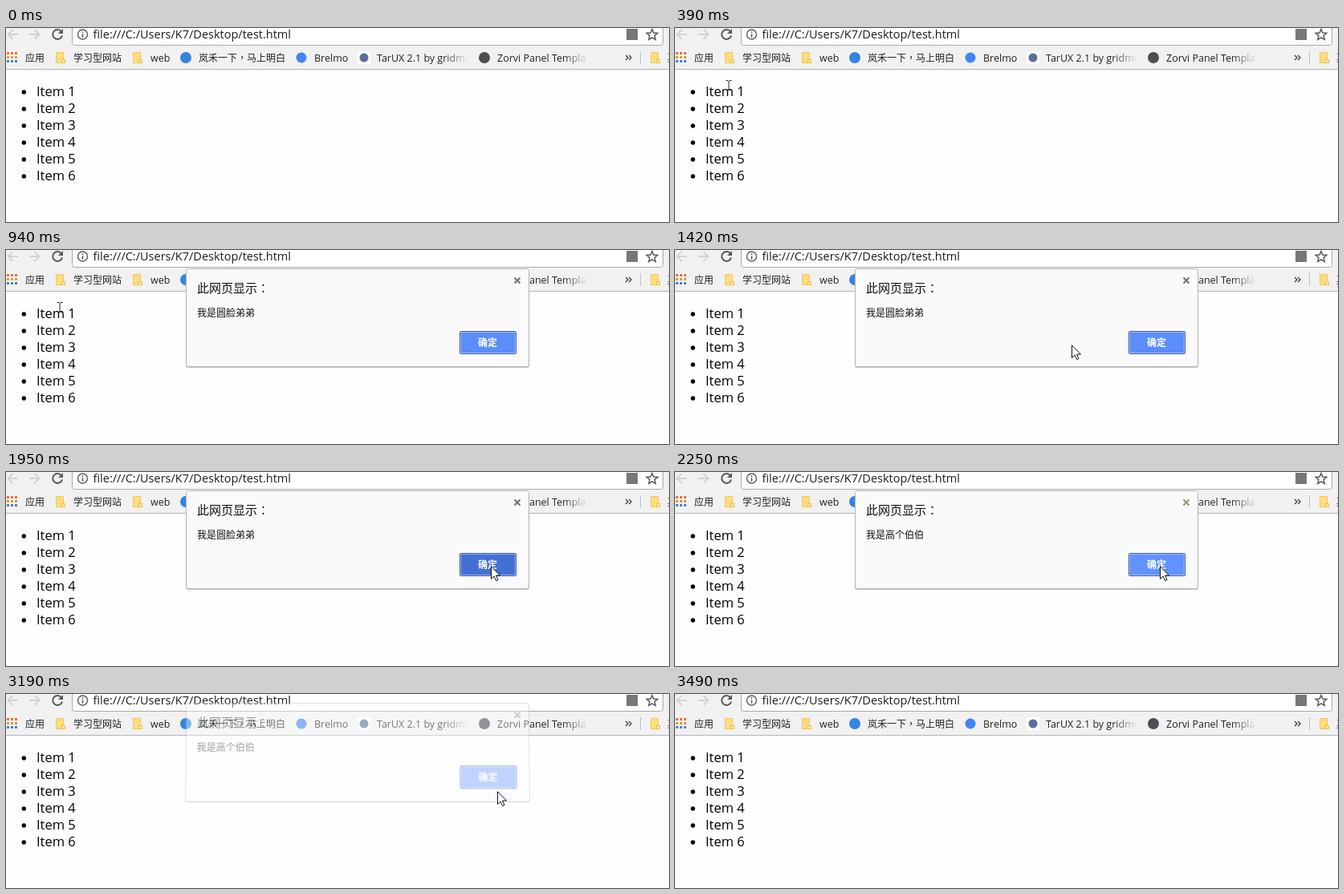
Write an HTML page that moves like this. It is 826 by 242 pixels and loops after 4.27 s.

```html
<!DOCTYPE html>
<html lang="zh-CN">
<head>
<meta charset="utf-8">
<title>test.html</title>
<style>
  html, body { margin: 0; width: 100%; height: 100%; overflow: hidden; background: #fefefe; }
  .stage { position: relative; width: 826px; height: 242px; overflow: hidden; }
  .layer { position: absolute; left: 0; top: 0; width: 826px; height: 242px; }
  text { font-family: "Open Sans", "Noto Sans CJK SC", "Noto Sans CJK JP", "Noto Sans", sans-serif; white-space: pre; }
  .cjk { font: 12px "Noto Sans CJK SC", "Noto Sans CJK JP", sans-serif; }
  .mid { font-family: "Noto Sans CJK TC", "Noto Sans CJK SC", sans-serif; } /* centred punctuation */
  .mark { font-size: 12.5px; }
  .url { font-size: 14.5px; }
  .item { font-size: 16.5px; }
  .title { font-size: 15px; }
  .ok { font-weight: 700; }

  .alert, .cursor { animation: 4270ms step-end infinite; }
  .alert { transform-origin: 438px 24px; opacity: 0; color: #5b8dfb; }
  #first { --paper: #fafafa; --cross: #757575; animation-name: first; }
  #second { --paper: #f9fbfb; --cross: #8f9d78; animation-name: second; }
  #beam { animation-name: beam; }
  #arrow { animation-name: arrow; }
  .cursor { opacity: 0; }

  @keyframes first {
    0% { opacity: 0; }
    18.03% { opacity: .56; transform: translateY(-11px) perspective(600px) rotateX(1.3deg); }
    19.9% { opacity: .92; transform: translateY(-2px) perspective(600px) rotateX(.3deg); }
    22.01% { opacity: 1; transform: none; color: #5b8dfb; }
    40.28% { opacity: 1; color: #6192ff; }
    45.66% { opacity: 1; color: #4470d6; }
    49.18% { opacity: .5; color: #6192ff; transform: translateY(-4px); }
    50.81%, 100% { opacity: 0; }
  }
  @keyframes second {
    0% { opacity: 0; }
    49.18% { opacity: .45; transform: translateY(-14px) perspective(600px) rotateX(1.5deg); }
    50.81% { opacity: .9; transform: translateY(-3px) perspective(600px) rotateX(.4deg); }
    52.69% { opacity: 1; transform: none; color: #6192ff; }
    69.32% { opacity: 1; color: #4470d6; }
    72.83% { opacity: .8; color: #6192ff; transform: translateY(-4px) perspective(600px) rotateX(.4deg); }
    74.7% { opacity: .4; transform: translateY(-12px) perspective(600px) rotateX(1.2deg); }
    76.34% { opacity: .1; transform: translateY(-19px) perspective(600px) rotateX(1.6deg); }
    78.22%, 100% { opacity: 0; }
  }
  @keyframes beam {
    0% { opacity: 0; }
    1.63% { opacity: 1; transform: translate(37px, 99px); }
    3.51% { opacity: 1; transform: translate(44px, 91px); }
    5.38% { opacity: 1; transform: translate(54px, 82px); }
    7.25% { opacity: 1; transform: translate(63px, 75px); }
    9.13% { opacity: 1; transform: translate(67px, 72px); }
    25.52%, 100% { opacity: 0; }
  }
  @keyframes arrow {
    0% { opacity: 0; }
    25.52% { opacity: 1; transform: translate(92px, 64px); }
    27.4% { opacity: 1; transform: translate(160px, 70px); }
    29.27% { opacity: 1; transform: translate(290px, 90px); }
    31.14% { opacity: 1; transform: translate(428px, 110px); }
    33.25% { opacity: 1; transform: translate(494px, 118px); }
    34.89% { opacity: 1; transform: translate(528px, 118px); }
    36.53% { opacity: 1; transform: translate(541px, 118px); }
    38.4% { opacity: 1; transform: translate(554px, 118px); }
    40.28% { opacity: 1; transform: translate(576px, 118px); }
    42.15% { opacity: 1; transform: translate(594px, 118px); }
    43.79% { opacity: 1; transform: translate(604px, 117px); }
    74.7% { opacity: 1; transform: translate(612px, 121px); }
    76.34% { opacity: 1; transform: translate(632px, 134px); }
    78.22% { opacity: 1; transform: translate(655px, 149px); }
    79.85% { opacity: 1; transform: translate(675px, 162px); }
    81.73%, 100% { opacity: 0; }
  }
</style>
</head>
<body>
<div class="stage">
  <svg class="layer" viewBox="0 0 826 242">
    <defs>
      <linearGradient id="fadeA" gradientUnits="userSpaceOnUse" x1="545" x2="576">
        <stop stop-color="#222"/><stop offset="1" stop-color="#222" stop-opacity="0"/>
      </linearGradient>
      <linearGradient id="fadeB" gradientUnits="userSpaceOnUse" x1="694" x2="725">
        <stop stop-color="#222"/><stop offset="1" stop-color="#222" stop-opacity="0"/>
      </linearGradient>
      <g id="folder">
        <path d="M.5 .5h9v9h2v4h-11z" fill="#ffdd7d" stroke="#efc75f"/>
        <path d="M7.5 9.5h4v4h-4z" fill="#ffe8a3" stroke="#e9bd4d"/>
      </g>
      <g id="box">
        <rect x="224" y="25" width="428" height="122" rx="3" opacity=".22"/>
        <rect x="224.5" y="23.5" width="427" height="122" rx="3" fill="var(--paper)" stroke="#b4b4b4"/>
        <text class="title" x="238" y="53" fill="#111">此网页显示<tspan class="mid" lang="zh-TW">：</tspan></text>
        <path d="M633.5 34.5l7 7m0-7l-7 7" stroke="var(--cross)" stroke-width="2.2"/>
        <rect x="565.5" y="101.5" width="70" height="28" rx="1.5" fill="currentColor" stroke="#3c5ca6"/>
        <rect x="566.5" y="102.5" width="68" height="26" fill="none" stroke="#fff" stroke-opacity=".45"/>
        <text class="cjk ok" x="588" y="120" fill="#fff">确定</text>
      </g>
    </defs>

    <rect width="826" height="51" fill="#f1f1f1"/>
    <path d="M0 51.5h826" stroke="#b4b4b4"/>
    <rect x="82.5" y="-8.5" width="736" height="30" rx="3" fill="#fff" stroke="#a9a9a9"/>

    <g fill="none" stroke="#d2d2d2" stroke-width="1.8">
      <path d="M15 8H2.5M8.5 2l-6 6 6 6"/>
      <path d="M29 8h12.5M35.5 2l6 6-6 6"/>
      <path d="M69 4.3A6 6 0 1 0 70 9.5" stroke="#5a5a5a" stroke-width="2"/>
    </g>
    <path d="M71 1v6h-6z" fill="#5a5a5a"/>
    <circle cx="95.5" cy="8" r="6" fill="none" stroke="#5a5a5a" stroke-width="1.4"/>
    <path d="M95.5 4.3v1.7m0 1.2v4.5" stroke="#5a5a5a" stroke-width="1.6"/>
    <text class="url" x="108.5" y="13" fill="#1c1c1c">file:///C:/Users/K7/Desktop/test.html</text>
    <rect x="773" y="1" width="14" height="14" fill="#777"/>
    <path d="M805 1.5l1.9 4.5 4.9 .4-3.7 3.2 1.1 4.8-4.2-2.6-4.2 2.6 1.1-4.8-3.7-3.2 4.9-.4z" fill="none" stroke="#5a5a5a" stroke-width="1.5"/>

    <g stroke-width="3" stroke-dasharray="3 2">
      <path d="M1 31.5h13" stroke="#e0763a"/>
      <path d="M1 36.5h13" stroke="#d9a032"/>
      <path d="M1 41.5h13" stroke="#4a7fd0"/>
    </g>
    <use href="#folder" x="62" y="30"/>
    <use href="#folder" x="158" y="30"/>
    <use href="#folder" x="803" y="30"/>
    <circle cx="224" cy="37" r="7" fill="#3385e0"/>
    <circle cx="368" cy="37" r="6.5" fill="#4285f4"/>
    <path d="M438 29h16v16h-16z" fill="#fff"/>
    <circle cx="446" cy="37" r="5.5" fill="#5c6f9e"/>
    <circle cx="596" cy="37" r="7" fill="#4b4f54"/>
    <g fill="#222">
      <text class="cjk" x="24" y="42">应用</text>
      <text class="cjk" x="84" y="42">学习型网站</text>
      <text class="mark" x="180" y="42">web</text>
      <text class="cjk" x="240" y="42">岚禾一下<tspan class="mid" lang="zh-TW">，</tspan>马上明白</text>
      <text class="mark" x="384" y="42">Brelmo</text>
      <text class="mark" x="462" y="42" fill="url(#fadeA)">TarUX 2.1 by gridmo</text>
      <text class="mark" x="612" y="42" fill="url(#fadeB)">Zorvi Panel Templa</text>
      <text class="cjk" x="824" y="42">其</text>
    </g>
    <path d="M772 34l3 3-3 3m4-6l3 3-3 3" fill="none" stroke="#444" stroke-width="1.4"/>
    <path d="M790.5 29v16" stroke="#b5c3d3"/>

    <path d="M22.3 80v106" stroke="#000" stroke-width="5.4" stroke-linecap="round" stroke-dasharray="0 21"/>
    <g class="item">
      <text x="38" y="85">Item 1</text>
      <text x="38" y="106">Item 2</text>
      <text x="38" y="127">Item 3</text>
      <text x="38" y="148">Item 4</text>
      <text x="38" y="169">Item 5</text>
      <text x="38" y="190">Item 6</text>
    </g>
  </svg>

  <svg class="layer alert" id="first" viewBox="0 0 826 242">
    <use href="#box"/>
    <text class="cjk" x="238" y="83" fill="#111">我是圆脸弟弟</text>
  </svg>
  <svg class="layer alert" id="second" viewBox="0 0 826 242">
    <use href="#box"/>
    <text class="cjk" x="238" y="83" fill="#111">我是高个伯伯</text>
  </svg>

  <svg class="layer" viewBox="0 0 826 242">
    <path class="cursor" id="beam" d="M-3.5-6.5h2.5l1 1 1-1h2.5M-3.5 5.5h2.5l1-1 1 1h2.5M0-5.5v10" fill="none" stroke="#222"/>
    <path class="cursor" id="arrow" d="M.5 .8v15.7l3.6-3.5 2.5 5.6 2.4-1-2.5-5.5h5z" fill="#fff" stroke="#111"/>
  </svg>
</div>
</body>
</html>
```
